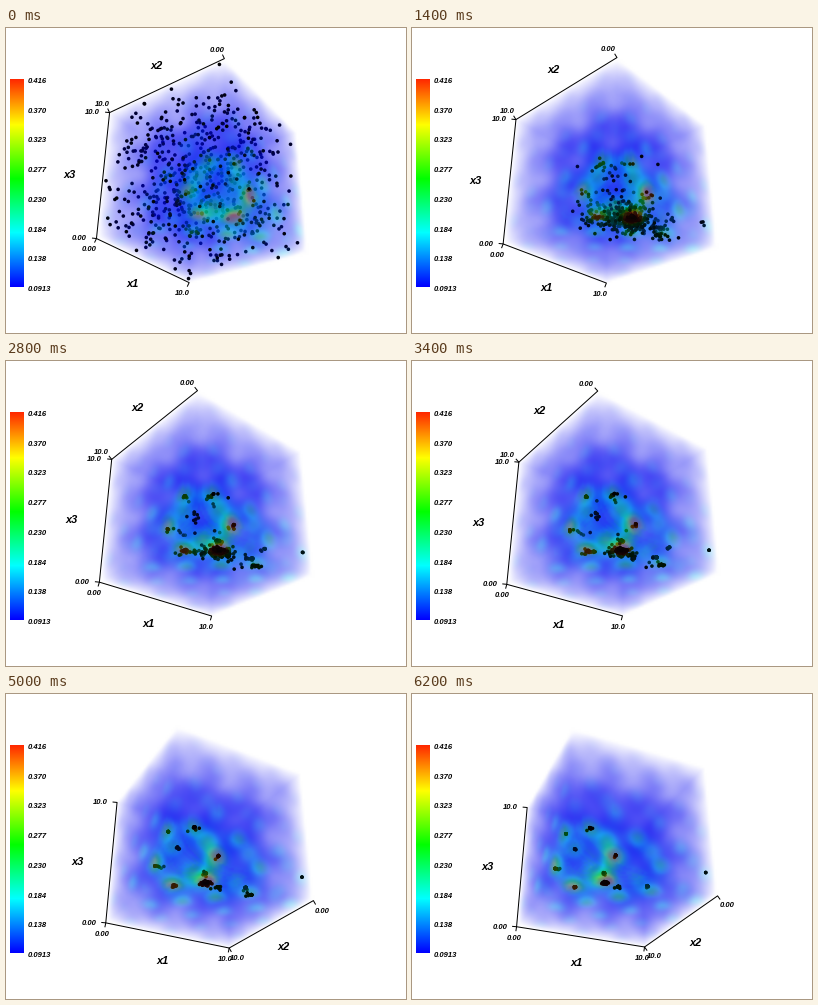
These frames come from a looping animation (400x305 px, 6.4 s). A matplotlib script:

```python
import numpy as np
import matplotlib.pyplot as plt
from matplotlib.animation import FuncAnimation

W, H, DPI = 400, 305, 100
FRAMES, INTERVAL = 32, 200
CENTER = np.array([199.2, 152.5])
FOCAL, DIST, ELEV = 569.0, 4.0, np.radians(30)
START_ANGLE, SWITCH = 55, 20       # degrees; frame where the x2 axis changes edge
VMIN, VMAX = 0.0913, 0.416
DENSITY, HAZE, SHADE = 6.5, 0.35, 0.94


def rainbow(n):
    """Blue to orange-red through green, n in 0..1."""
    n = 0.96 * n
    return np.stack([np.clip(4 * n - 2, 0, 1),
                     np.clip(np.minimum(4 * n, 4 - 4 * n), 0, 1),
                     np.clip(2 - 4 * n, 0, 1)], axis=-1)


def bump(x, y, z):
    """Keane's bump function, zero where the product constraint fails."""
    a, b, c = np.cos(x) ** 2, np.cos(y) ** 2, np.cos(z) ** 2
    top = np.abs(a * a + b * b + c * c - 2 * a * b * c)
    value = top / np.sqrt(x * x + 2 * y * y + 3 * z * z + 1e-6)
    return np.where(x * y * z >= 0.75, value, 0)


def camera(k):
    """Right, up and forward vectors in the unit cube's frame."""
    a = np.radians(START_ANGLE - k)
    s, c = np.sin(a), np.cos(a)
    se, ce = np.sin(ELEV), np.cos(ELEV)
    return np.array([[c, -s, 0], [-se * s, -se * c, ce], [ce * s, ce * c, se]])


def project(points, cam):
    q = (np.asarray(points, float) / 10 - 0.5) @ cam.T
    scale = FOCAL / (DIST + q[:, 2])
    return np.column_stack([CENTER[0] + q[:, 0] * scale,
                            CENTER[1] - q[:, 1] * scale])


def march(eye, rays, limit, steps):
    """Composite the volume front to back; returns colour and transmittance."""
    lo, hi = (-0.5 - eye) / rays, (0.5 - eye) / rays
    near = np.minimum(lo, hi).max(axis=1)
    far = np.minimum(np.maximum(lo, hi).min(axis=1), limit)
    span = np.maximum(far - near, 0)
    length = span * np.linalg.norm(rays, axis=1) / steps
    color = np.zeros((len(rays), 3), np.float32)
    clear = np.ones(len(rays), np.float32)
    for i in range(steps):
        t = near + span * (i + 0.5) / steps
        x, y, z = (10 * (eye[j] + 0.5 + rays[:, j] * t) for j in range(3))
        value = bump(x, y, z)
        hue = np.clip((value - VMIN) / (VMAX - VMIN), 0, 1) ** 1.3
        opacity = DENSITY * np.minimum(value / VMAX, 1) + HAZE
        passed = np.exp(-opacity * length)
        color += rainbow(hue) * (SHADE * clear * (1 - passed))[:, None]
        clear *= passed
    return color, clear


CELL = 2
COLS, ROWS = W // CELL, (H + 1) // CELL
gx, gy = np.meshgrid(np.arange(COLS) * CELL + 1, np.arange(ROWS) * CELL + 1)
SCREEN = np.column_stack([(gx.ravel() - CENTER[0]) / FOCAL,
                          (CENTER[1] - gy.ravel()) / FOCAL,
                          np.ones(gx.size)])


def volume(cam):
    eye = (-DIST * cam[2]).astype(np.float32)
    rays = (SCREEN @ cam).astype(np.float32)
    lo, hi = (-0.5 - eye) / rays, (0.5 - eye) / rays
    hit = np.maximum(lo, hi).min(axis=1) > np.minimum(lo, hi).max(axis=1)
    image = np.ones((len(rays), 3), np.float32)
    color, clear = march(eye, rays[hit], np.float32(99), 64)
    image[hit] = color + clear[:, None]
    return np.clip(image, 0, 1).reshape(ROWS, COLS, 3)


# Optima the swarm settles on: x1, x2, x3, weight, last frame
OPTIMA = np.array([
    (3.0, 1.45, 0.2, 62, 99), (3.2, 0.3, 1.5, 3, 99), (1.7, 3.1, 0.35, 6, 99),
    (0.4, 3.2, 1.4, 3, 99), (1.45, 0.15, 2.9, 2, 99), (0.5, 1.7, 3.1, 2, 99),
    (2.9, 1.3, 0.7, 5, 99), (1.0, 1.4, 2.0, 2, 99), (4.0, 1.7, 0.2, 6, 99),
    (5.9, 1.5, 0.55, 3, 99), (6.3, 1.5, 0.15, 3, 27), (6.5, 0.9, 1.2, 2, 23),
    (9.42, 0.2, 1.6, 0.6, 99)])

rng = np.random.default_rng(12)
starts = rng.uniform(0.05, 9.95, (680, 3))
starts = starts[starts.prod(axis=1) > 0.75]
count = len(starts)
goal = OPTIMA[rng.choice(len(OPTIMA), count, p=OPTIMA[:, 3] / OPTIMA[:, 3].sum())]
# The swarm sinks along x3 faster than it closes in along x1 and x2.
rates = (0.5 + 0.36 * rng.random((count, 1))) ** np.array([0.65, 0.65, 1.2])


def swarm(k):
    alive = goal[:, 4] >= k
    target = goal[alive, :3]
    return target + (starts[alive] - target) * rates[alive] ** k


fig = plt.figure(figsize=(W / DPI, H / DPI), dpi=DPI, facecolor="white")
ax = fig.add_axes([0, 0, 1, 1])
ax.axis("off")

FONT = dict(family="Liberation Sans", weight="bold", style="italic", color="black")
PX = 72 / DPI


def label(x, y, text, size=7.6, ha="center"):
    return ax.text(x, y, text, fontsize=size * PX, ha=ha, va="center", **FONT)


picture = ax.imshow(np.ones((ROWS, COLS, 3)), extent=(0, W, ROWS * CELL, 0),
                    interpolation="bilinear", aspect="auto")
ax.imshow(rainbow(np.linspace(1, 0, 208))[:, None], extent=(4, 18, 259, 51),
          interpolation="nearest", aspect="auto")
bar_labels = ["0.416", "0.370", "0.323", "0.277", "0.230", "0.184", "0.138", "0.0913"]
for i, text in enumerate(bar_labels):
    label(21.5, 53.5 + 29.7 * i, text, ha="left")
ax.set_xlim(0, W)
ax.set_ylim(H, 0)

dots = ax.scatter([], [], s=(3.6 * PX) ** 2, linewidths=0, zorder=3)
axes3d = [dict(line=ax.plot([], [], color="black", lw=PX, zorder=4)[0],
               title=label(0, 0, name, 11),
               ends=[label(0, 0, "0.00"), label(0, 0, "10.0")])
          for name in ("x1", "x2", "x3")]


def place_axis(parts, edge, cam):
    a, b = project(edge, cam)
    mid = (a + b) / 2
    n = np.array([a[1] - b[1], b[0] - a[0]]) / np.hypot(*(b - a))
    if n @ (mid - CENTER) < 0:
        n = -n
    path = np.array([a + 4 * n, a, b, b + 4 * n])
    parts["line"].set_data(path[:, 0], path[:, 1])
    for text, end in zip(parts["ends"], (a, b)):
        text.set_position(end + n * (17, 10.5) + (0, 1.3))
    parts["title"].set_position(mid + n * (22 + 12 * n[0] ** 2, 24) + (0, 2))


rendered = {}


def render(k):
    """Volume image, dot positions and dot colours, kept for later loops."""
    if k not in rendered:
        cam = camera(k)
        points = swarm(k)
        eye = -DIST * cam[2]
        depth = (points / 10 - 0.5 - eye) @ cam[2]
        points = points[np.argsort(-depth)]
        tint, _ = march(eye, points / 10 - 0.5 - eye, 1.0, 30)
        rendered[k] = volume(cam), project(points, cam), np.clip(tint, 0, 1)
    return rendered[k]


def draw(k):
    cam = camera(k)
    image, spots, tint = render(k)
    picture.set_data(image)
    dots.set_offsets(spots)
    dots.set_facecolor(tint)
    x2_edge = [(0, 0, 10), (0, 10, 10)] if k < SWITCH else [(10, 0, 0), (10, 10, 0)]
    edges = [[(0, 10, 0), (10, 10, 0)], x2_edge, [(0, 10, 0), (0, 10, 10)]]
    for parts, edge in zip(axes3d, edges):
        place_axis(parts, edge, cam)
    return []


anim = FuncAnimation(fig, draw, frames=FRAMES, interval=INTERVAL,
                     init_func=lambda: [], repeat=True, repeat_delay=0, blit=False)
plt.show()
```
